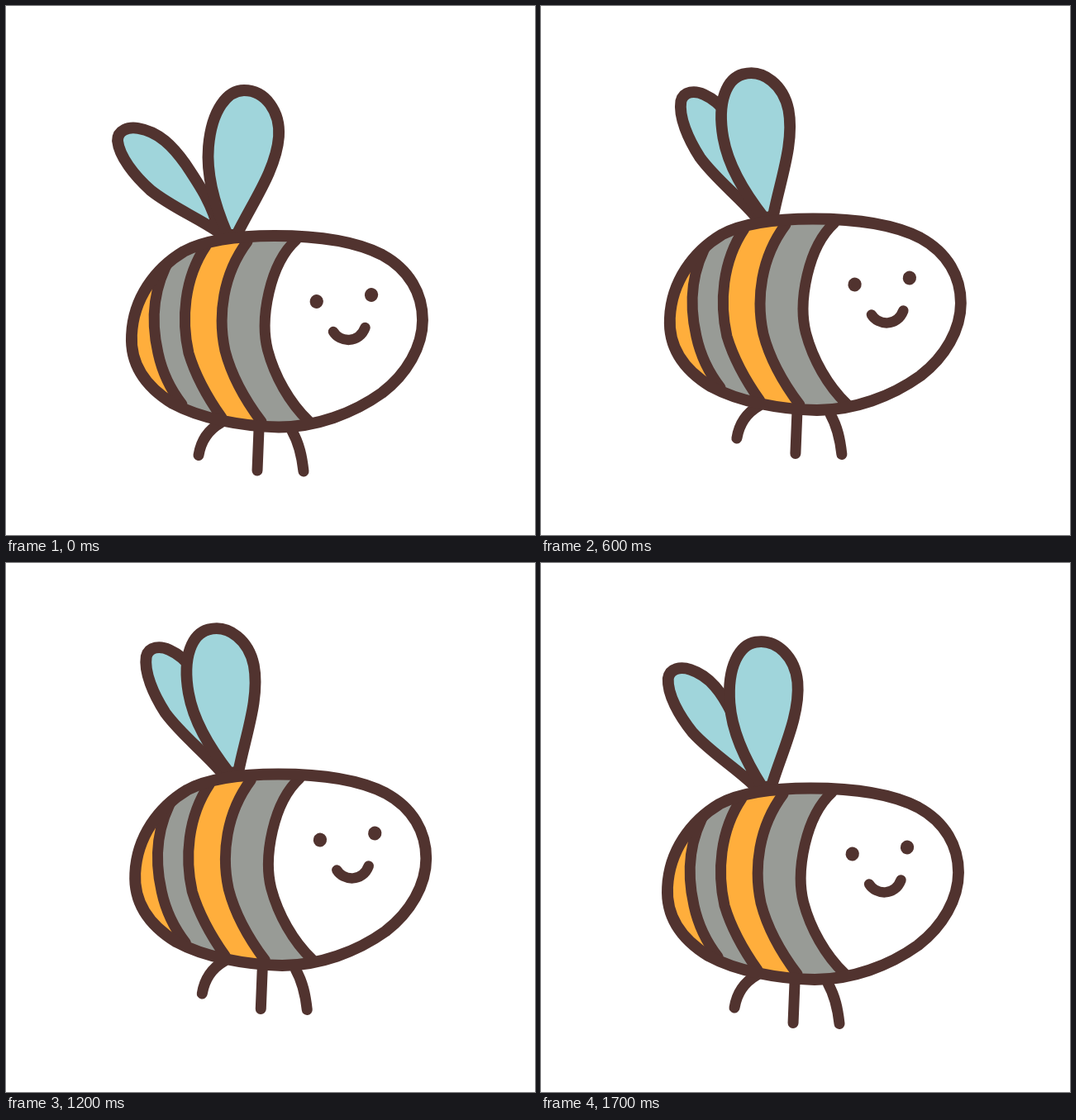
These frames come from a looping animation (640x640 px, 1800 ms). An HTML page with a canvas:

```html
<!DOCTYPE html>
<html lang="en">
<head>
<meta charset="utf-8">
<title>Bee</title>
<style>
  html, body { margin: 0; width: 100%; height: 100%; overflow: hidden; background: #fff; }
  canvas { display: block; width: 640px; height: 640px; }
</style>
</head>
<body>
<canvas id="stage" width="640" height="640"></canvas>
<script>
const ctx = document.getElementById('stage').getContext('2d');

const BROWN = '#51332f', YELLOW = '#ffae3c', GREY = '#989b96', BLUE = '#a0d5db', WHITE = '#fff';
const STEP = 100, STEPS = 18, FLAP = 4.5;

// Height above the lowest point at each step: two bobs per loop.
const LIFT = [0, 8, 15, 22.5, 29.3, 28, 20.5, 13, 5.5,
              0, 9.5, 16, 22.5, 32, 28, 20.5, 13, 5.5];

const body = new Path2D(`M152 398 C154 354 180 318 215 297 C245 281 290 278 325 278
  C370 278 420 283 455 301 C488 319 504 348 504 380 C504 412 485 445 455 468
  C420 493 375 509.5 330 509.5 C285 508.5 235 499 202 481 C171 462 150 435 152 398Z`);

const smallWing = {
  path: new Path2D(`M258 274 C230 255 200 243 175 223 C155 205 137 182 135 163
    C135 150 148 146 160 148 C185 152 202 170 217 191 C235 218 250 240 258 274Z`),
  pivot: [254, 265]
};

const bigWing = {
  path: new Path2D(`M268 277 C252 240 242 205 245 170 C249 125 268 102 288 102
    C314 102 332 128 330 158 C327 198 298 238 279 277Z`),
  pivot: [268, 283]
};

const stripes = [
  ['M200 303 C176 343 176 385 184 420 C189 443 199 464 213 482', GREY],
  ['M242 290 C215 330 212 380 221 420 C230 450 244 474 261 498', YELLOW],
  ['M292 285 C262 325 256 375 265 417 C273 448 288 475 309 503', GREY],
  ['M351 283 C319 312 307 378 316.5 416 C325 448 343 480 366 502', WHITE]
].map(([d, fill]) => ({
  line: new Path2D(d),
  area: new Path2D(d + ' L366 540 L600 540 L600 240 L351 240Z'),
  fill
}));

const legs = new Path2D(`M260 504 C246 512 236 525 233 543.5 M306 512 L304 562
  M346 514 C355 530 358 545 360 563`);
const smile = new Path2D('M396 394 C404 407 427 409 434.5 389');

function outline(path, width = 13) {
  ctx.strokeStyle = BROWN;
  ctx.lineWidth = width;
  ctx.stroke(path);
}

function fill(path, color) {
  ctx.fillStyle = color;
  ctx.fill(path);
}

function drawWing({ path, pivot: [x, y] }, degrees) {
  ctx.save();
  ctx.translate(x, y);
  ctx.rotate(degrees * Math.PI / 180);
  ctx.translate(-x, -y);
  fill(path, BLUE);
  outline(path, 13.8);
  ctx.restore();
}

function drawBody() {
  ctx.save();
  ctx.clip(body);
  fill(body, YELLOW);
  for (const s of stripes) fill(s.area, s.fill);
  for (const s of stripes) outline(s.line);
  ctx.restore();
  outline(body, 13.8);
}

function drawEye(x, y) {
  ctx.fillStyle = BROWN;
  ctx.beginPath();
  ctx.ellipse(x, y, 8.1, 8.5, 0.3, 0, Math.PI * 2);
  ctx.fill();
}

// 0 = wings spread, 1 = wings folded together.
function wingFold(step) {
  const phase = step % FLAP;
  const fromSpread = Math.min(phase, FLAP - 0.5 - phase);
  if (fromSpread <= 0) return 0;
  return fromSpread <= 0.5 ? 0.61 : 1;
}

function draw(step) {
  const lift = LIFT[step], turn = 15 * wingFold(step);
  ctx.fillStyle = WHITE;
  ctx.fillRect(0, 0, 640, 640);
  ctx.save();
  ctx.translate(lift * 0.19, -lift);
  drawWing(smallWing, turn);
  drawWing(bigWing, -turn);
  outline(legs);
  drawBody();
  drawEye(375.7, 357.5);
  drawEye(442, 349.5);
  outline(smile, 12.5);
  ctx.restore();
}

ctx.lineCap = ctx.lineJoin = 'round';
const start = performance.now();

function tick() {
  const elapsed = performance.now() - start;
  draw(Math.floor(elapsed / STEP) % STEPS);
  requestAnimationFrame(tick);
}
tick();
</script>
</body>
</html>
```
